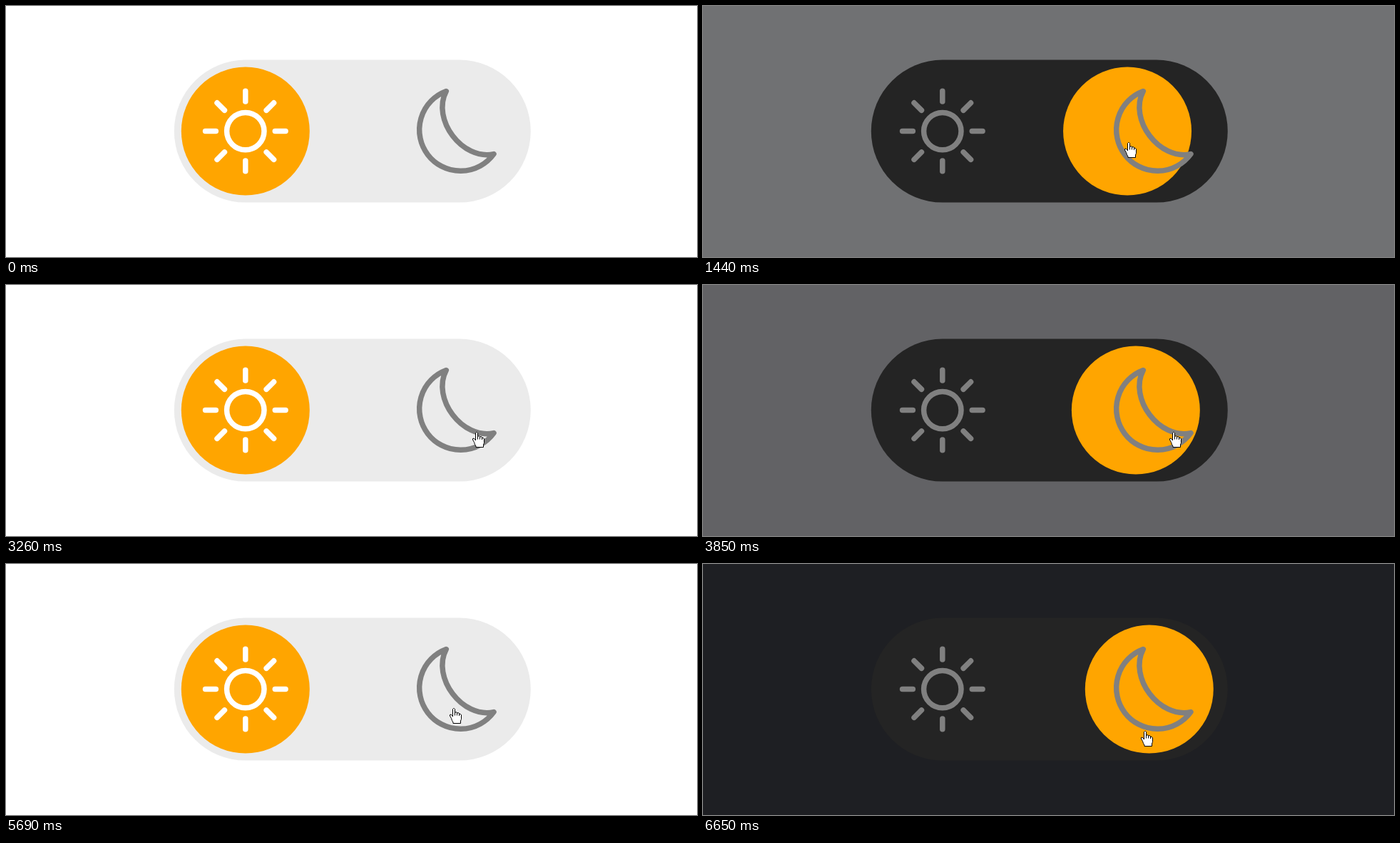
Recreate the animation shown at these times as an HTML page with a canvas. Size 969x352 px, loop 6740 ms.

```html
<!DOCTYPE html>
<html lang="en">
<head>
<meta charset="utf-8">
<title>Day and night toggle</title>
<style>
  html, body { margin: 0; width: 100%; height: 100%; overflow: hidden; background: #fff; }
  canvas { display: block; width: 969px; height: 352px; }
</style>
</head>
<body>
<canvas id="stage" width="969" height="352"></canvas>
<script>
const ctx = document.getElementById('stage').getContext('2d');
const LOOP = 6740;
const DAY = [255, 255, 255], NIGHT = [30, 31, 35];
const GRAY = '#808080';
const CLICKS = [1257, 2398, 3645, 4800, 5885];

// Each glide of the pointer ends at x, y
const START = { x: 495, y: 350 };
const GLIDES = [
  { from: 290, to: 950, x: 561, y: 226 },
  { from: 950, to: 1060, x: 597, y: 191 },
  { from: 1600, to: 2180, x: 391, y: 193 },
  { from: 2980, to: 3250, x: 660, y: 206 },
  { from: 4050, to: 4510, x: 353, y: 209 },
  { from: 5300, to: 5680, x: 628, y: 202 },
  { from: 6570, to: 6645, x: 620, y: 234 }
];

const HAND = new Path2D('M-.5 .5H.5L1.5 1.5V6.5L3.5 5.5L4.5 7L6.5 6.5L7.5 8L9.5 8.5' +
  'L10.5 10V15.5L9.5 18V21.5H-1V20L-2.5 17.5L-3.5 14.5L-5.5 11V9.5L-4 9L-2.5 10.5L-1.5 12V1.5Z');
const KNUCKLES = new Path2D('M1.5 6V10.5M4.5 7V10.5M7.5 8V11');
const ARROW = new Path2D('M.5 .5V16.5L4.5 13L7 18.5L9.5 17.5L7 12H11.5Z');
const MOON = new Path2D('M617.5 119.9A57.7 57.7 0 1 0 684.2 208C640.3 217.5 596.6 159.6 617.5 119.9Z');

const mix = (a, b, k) => a + (b - a) * k;
const clamp = k => Math.min(1, Math.max(0, k));
const smooth = k => k * k * (3 - 2 * k);

// The CSS "ease" curve
function ease(x) {
  if (x <= 0) return 0;
  if (x >= 1) return 1;
  const curve = (u, a, b) => 3 * u * (1 - u) * ((1 - u) * a + u * b) + u ** 3;
  let lo = 0, hi = 1;
  for (let i = 0; i < 24; i++) {
    const mid = (lo + hi) / 2;
    if (curve(mid, .25, .25) < x) lo = mid; else hi = mid;
  }
  return curve(lo, .1, 1);
}

function pointerAt(t) {
  let { x, y } = START;
  for (const g of GLIDES) {
    const k = smooth(clamp((t - g.from) / (g.to - g.from)));
    x = mix(x, g.x, k);
    y = mix(y, g.y, k);
  }
  return [Math.round(x), Math.round(y)];
}

function disc(x, y, r) {
  ctx.beginPath();
  ctx.arc(x, y, r, 0, Math.PI * 2);
}

function drawSun(color) {
  ctx.save();
  ctx.translate(336, 176);
  ctx.strokeStyle = color;
  disc(0, 0, 26.2);
  ctx.stroke();
  for (let i = 0; i < 8; i++) {
    ctx.rotate(Math.PI / 4);
    ctx.beginPath();
    ctx.moveTo(41.5, 0);
    ctx.lineTo(56.25, 0);
    ctx.stroke();
  }
  ctx.restore();
}

function drawToggle(dark, slide) {
  ctx.save();
  ctx.translate(-.2, -.4);
  ctx.fillStyle = dark ? '#242424' : '#ebebeb';
  ctx.beginPath();
  ctx.roundRect(236, 76, 500, 200, 100);
  ctx.fill();

  ctx.fillStyle = '#ffa500';
  disc(mix(336, 626, slide), 176, 90);
  ctx.fill();

  ctx.lineWidth = 7.5;
  ctx.lineCap = ctx.lineJoin = 'round';
  drawSun(dark ? GRAY : '#fff');
  ctx.strokeStyle = GRAY;
  ctx.stroke(MOON);
  ctx.restore();
}

function drawPointer(t) {
  const [x, y] = pointerAt(t);
  const overTrack = y < 276;
  const shape = overTrack ? HAND : ARROW;
  ctx.save();
  ctx.translate(x, y);
  ctx.fillStyle = '#fff';
  ctx.strokeStyle = '#000';
  ctx.fill(shape);
  ctx.stroke(shape);
  if (overTrack) ctx.stroke(KNUCKLES);
  ctx.restore();
}

function draw(t) {
  const past = CLICKS.filter(c => c <= t);
  const dark = past.length % 2 === 1;
  const age = past.length ? t - past[past.length - 1] : Infinity;
  const level = ms => dark ? ease(age / ms) : 1 - ease(age / ms);

  const sky = level(500);
  ctx.fillStyle = `rgb(${DAY.map((c, i) => Math.round(mix(c, NIGHT[i], sky)))})`;
  ctx.fillRect(0, 0, 969, 352);
  drawToggle(dark, level(300));
  if (t >= GLIDES[0].from) drawPointer(t);
}

const begin = performance.now();
function tick() {
  draw((performance.now() - begin) % LOOP);
  requestAnimationFrame(tick);
}
tick();
</script>
</body>
</html>
```
